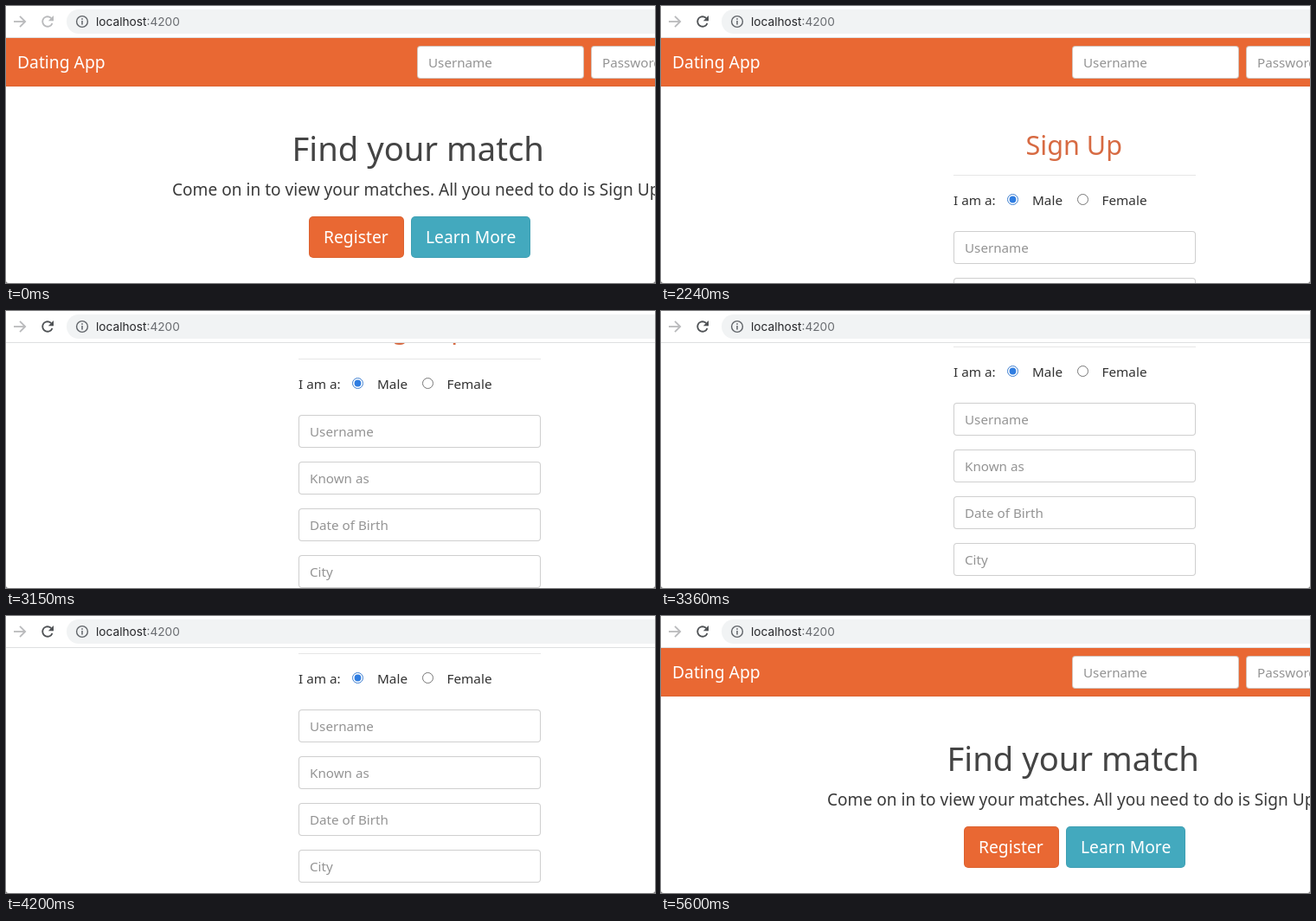
Write an HTML page with a canvas that moves like this. It is 750x320 px and loops after 6790 ms.

```html
<!DOCTYPE html>
<html lang="en">
<head>
<meta charset="utf-8">
<title>Dating App</title>
<style>
  html, body { margin: 0; width: 100%; height: 100%; overflow: hidden; background: #fff; }
  canvas { display: block; }
</style>
</head>
<body>
<canvas id="stage" width="750" height="320"></canvas>
<script>
const ctx = document.getElementById('stage').getContext('2d');
const LOOP = 6790, TICK = 70;
const SIGN_UP = 1820, CANCEL = 5040;
const ORANGE = [233, 104, 51], HOVER = [207, 88, 36], PRESSED = [200, 83, 32];
const SANS = '"Noto Sans", "Open Sans", sans-serif';
const UI = 'Inter, Roboto, sans-serif';

// Scroll offset at [time, y]; each value holds until the next.
const SCROLL = [
  [2730, 2], [2800, 10], [2870, 28], [2940, 56], [3010, 90], [3080, 118],
  [3150, 140], [3220, 148], [3290, 152], [3360, 154], [3500, 155], [3640, 156],
  [3780, 157], [3990, 156], [4060, 155], [4130, 153], [4200, 152]
];

const rgb = c => `rgb(${c.map(Math.round).join(',')})`;
const mix = (a, b, k) => a.map((v, i) => v + (b[i] - v) * k);
const ramp = (t, start, steps) => Math.max(0, Math.min(1, (t - start + TICK) / (steps * TICK)));

function rect(x, y, w, h, color) {
  ctx.fillStyle = color;
  ctx.fillRect(x, y, w, h);
}

function box(x, y, w, h, r, fill, border) {
  ctx.beginPath();
  ctx.roundRect(x, y, w, h, r);
  ctx.fillStyle = border || fill;
  ctx.fill();
  if (!border) return;
  ctx.beginPath();
  ctx.roundRect(x + 1, y + 1, w - 2, h - 2, r - 1);
  ctx.fillStyle = fill;
  ctx.fill();
}

function text(s, x, y, size, color, family = SANS) {
  ctx.font = `${size}px ${family}`;
  ctx.fillStyle = color;
  ctx.fillText(s, x, y);
  return ctx.measureText(s).width;
}

function line(points, color, width) {
  ctx.beginPath();
  points.forEach(([x, y]) => ctx.lineTo(x, y));
  ctx.strokeStyle = color;
  ctx.lineWidth = width;
  ctx.stroke();
}

function circle(x, y, r, color, width) {
  ctx.beginPath();
  ctx.arc(x, y, r, 0, Math.PI * 2);
  if (width) {
    ctx.strokeStyle = color;
    ctx.lineWidth = width;
    ctx.stroke();
  } else {
    ctx.fillStyle = color;
    ctx.fill();
  }
}

function field(label, x, y, w, border) {
  box(x, y, w, 38, 4, '#fff', border);
  text(label, x + 13, y + 25, 15.2, '#949494');
}

function button(label, x, w, color) {
  box(x, 243, w, 48, 5, rgb(color), rgb(mix(color, [0, 0, 0], 0.06)));
  text(label, x + 17, 274, 19.3, '#fff');
}

function navbar() {
  rect(0, 37, 750, 56, rgb(ORANGE));
  rect(0, 92, 750, 1, '#dc6230');
  text('Dating App', 13, 72, 19.3, '#fff');
  field('Username', 475, 46, 193, '#d2c3ba');
  field('Password', 676, 46, 193, '#d2c3ba');
}

function home(t) {
  text('Find your match', 330.5, 179, 38.2, '#444');
  text('Come on in to view your matches. All you need to do is Sign Up!', 192, 219, 19.1, '#3a3a3a');
  let color = ORANGE;
  if (t < SIGN_UP) {
    color = mix(ORANGE, HOVER, ramp(t, 1190, 4));
    color = mix(color, PRESSED, ramp(t, 1610, 2));
  }
  button('Register', 350, 110, color);
  button('Learn More', 468, 138, [67, 169, 190]);
}

function radio(x, y, checked) {
  circle(x, y, 6, checked ? '#3f7fd0' : '#777', 1);
  if (checked) circle(x, y, 3.9, '#2f7de1');
}

function form() {
  text('Sign Up', 421.5, 172, 30.6, '#d76a42');
  rect(338, 195, 280, 1, '#e6e6e6');
  text('I am a:', 338, 230, 15.3, '#333');
  radio(406.5, 223.5, true);
  text('Male', 429, 230, 15.3, '#333');
  radio(487.5, 223.5, false);
  text('Female', 509.5, 230, 15.3, '#333');
  ['Username', 'Known as', 'Date of Birth', 'City', 'Country'].forEach((label, i) =>
    field(label, 338, 260 + i * 54, 280, '#cfcfcf'));
}

function browserBar(t) {
  rect(0, 0, 750, 37, '#fff');
  rect(0, 36, 750, 1, '#dedfe1');
  box(70, 4, 720, 28, 14, '#f1f3f4');

  line([[9, 18], [22, 18]], '#b9babc', 1.8);
  line([[16, 11.8], [22.2, 18], [16, 24.2]], '#b9babc', 1.8);

  const ink = t < 840 ? '#b9babc' : '#505356';
  ctx.beginPath();
  ctx.arc(48, 18, 5.8, 0.35, Math.PI * 1.76);
  ctx.strokeStyle = ink;
  ctx.lineWidth = 1.9;
  ctx.stroke();
  ctx.beginPath();
  ctx.moveTo(55, 11);
  ctx.lineTo(55, 17.2);
  ctx.lineTo(48.8, 17.2);
  ctx.fillStyle = ink;
  ctx.fill();

  circle(88, 18, 6.4, '#5f6368', 1.4);
  rect(87.25, 17, 1.5, 4.6, '#5f6368');
  rect(87.25, 14.2, 1.5, 1.6, '#5f6368');
  const w = text('localhost', 104, 23, 13.7, '#252629', UI);
  text(':4200', 104 + w, 23, 13.7, '#6a6d71', UI);
}

function windowCorners() {
  for (const [x, side] of [[0, 1], [750, -1]]) {
    ctx.beginPath();
    ctx.moveTo(x, 317);
    ctx.quadraticCurveTo(x, 320, x + side * 3, 320);
    ctx.lineTo(x, 320);
    ctx.fillStyle = '#777';
    ctx.fill();
  }
}

function draw(now) {
  const t = Math.floor((now % LOOP) / TICK) * TICK;
  const signingUp = t >= SIGN_UP && t < CANCEL;
  const scroll = signingUp ? SCROLL.reduce((y, [at, v]) => (t >= at ? v : y), 0) : 0;

  rect(0, 0, 750, 320, '#fff');
  ctx.save();
  ctx.translate(0, -scroll);
  navbar();
  if (signingUp) form();
  else home(t);
  ctx.restore();
  browserBar(t);
  windowCorners();
}

const start = performance.now();
function tick() {
  draw(performance.now() - start);
  requestAnimationFrame(tick);
}
tick();
</script>
</body>
</html>
```
